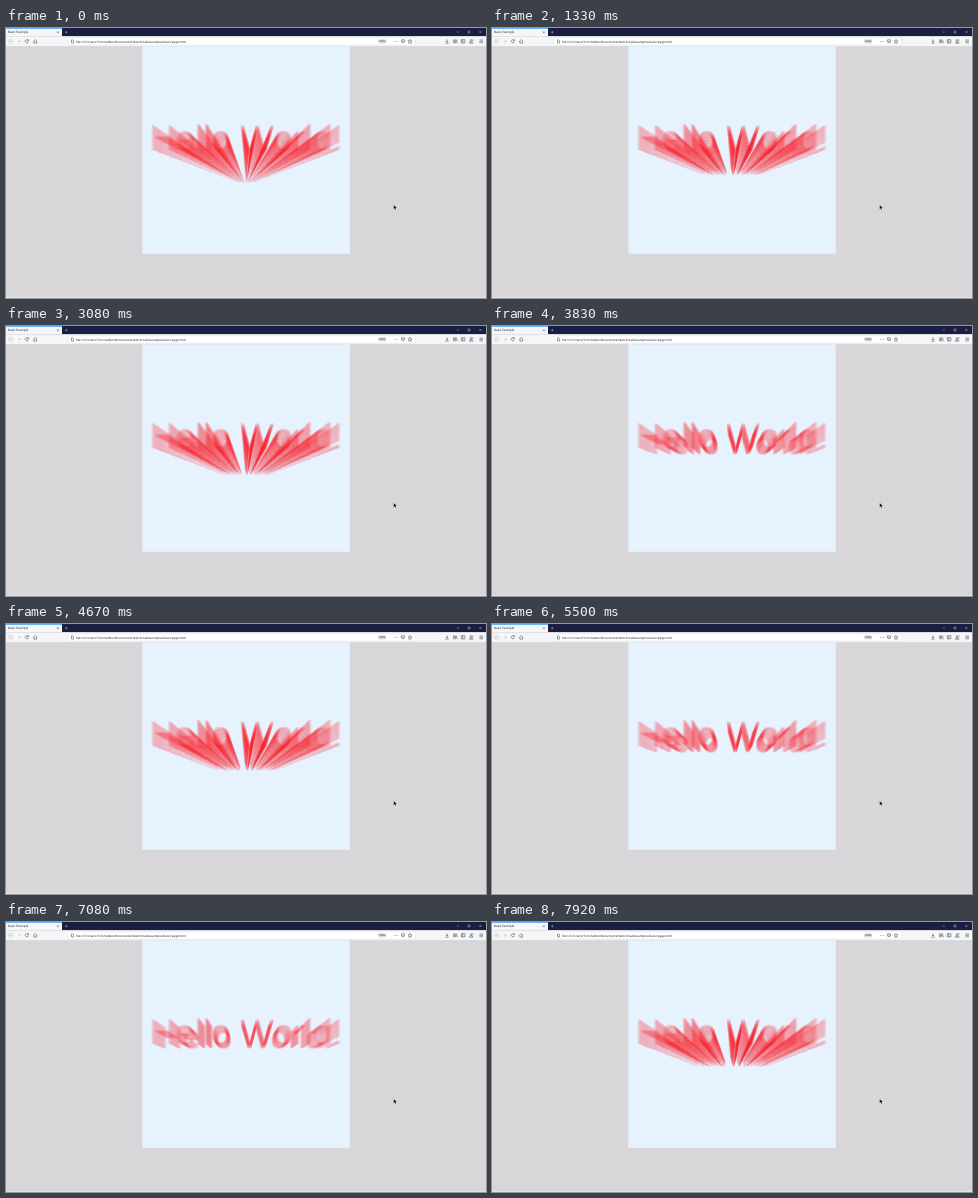
An HTML page that plays this animation: 480 by 270 pixels, repeating every 8.01 s.

```html
<!DOCTYPE html>
<html lang="en">
<head>
<meta charset="utf-8">
<title>Basic Example</title>
<style>
  html, body { margin: 0; width: 100%; height: 100%; overflow: hidden; background: #d8d6d8; }
  svg { display: block; width: 100vw; height: 100vh; }
  text { text-rendering: geometricPrecision; }
  .ui { font-family: "Noto Sans", "Open Sans", sans-serif; font-size: 3px; fill: #222; }
  .icon { fill: none; stroke: #4a4a4f; stroke-width: .55; }
  .light { stroke: #d4d5de; stroke-width: .4; }
  .off { stroke: #b9b9bd; }
  #trail { font: 36px "Liberation Sans", Arial, sans-serif; fill: #ff282d; text-anchor: middle; }
</style>
</head>
<body>
<svg viewBox="0 0 480 270">
  <rect width="480" height="270" fill="#d8d6d8"/>
  <rect y="269.4" width="480" height=".6" fill="#eeeeef"/>

  <!-- tab strip -->
  <rect width="480" height="8.3" fill="#1b1e43"/>
  <rect width="56" height="8.3" fill="#f5f6f7"/>
  <rect width="56" height=".6" fill="#0a84ff"/>
  <text class="ui" x="2" y="5.4">Basic Example</text>
  <path class="icon" d="M51 3.4l1.8 1.8m0-1.8l-1.8 1.8"/>
  <path class="icon light" d="M59 4.2h2.6m-1.3-1.3v2.6M450.7 4h2.2M462 3h2v2h-2zM473.4 3l2 2m0-2l-2 2"/>

  <!-- toolbar -->
  <rect y="8.3" width="480" height="10" fill="#f5f6f7"/>
  <rect y="18" width="480" height=".3" fill="#c8c8cb"/>
  <g class="icon">
    <circle class="off" cx="4.8" cy="13.3" r="2.4" stroke-width=".35"/>
    <path class="off" d="M6 13.3H3.6m1-1l-1 1 1 1M11.8 13.3h2.6m-1-1l1 1-1 1"/>
    <path d="M22.2 12.4a1.6 1.6 0 1 0 .2 1.3M22.5 11.4v1.3h-1.3"/>
    <path d="M27.2 13.5l2-1.9 2 1.9M27.9 13.2v1.9h2.6v-1.9"/>
  </g>
  <rect x="62" y="9.8" width="347.5" height="7.2" rx=".5" fill="#fff" stroke="#cfcfd2" stroke-width=".3"/>
  <path class="icon" stroke-width=".4" d="M65.5 11.9h1.3l.8.8v2.3h-2.1z"/>
  <text class="ui" x="70" y="14.6" font-size="3.1">file:///C:/Users/Tom Velden/Documents/Sketch/Lab/examples/basic/page.html</text>
  <rect x="371.7" y="11.3" width="8.8" height="4.2" rx="2.1" fill="#dcdcde"/>
  <text class="ui" x="376.1" y="14.3" text-anchor="middle" style="font-size:2.5px">100%</text>
  <g fill="#4a4a4f">
    <circle cx="388.6" cy="13.4" r=".4"/><circle cx="390" cy="13.4" r=".4"/><circle cx="391.4" cy="13.4" r=".4"/>
  </g>
  <g class="icon">
    <path d="M395.4 11.8h3.2v1.4a1.6 1.6 0 0 1-3.2 0zM396.2 12.9l.8.8.8-.8"/>
    <path d="M404 11.4l.6 1.3 1.4.2-1 1 .2 1.4-1.2-.7-1.2.7.2-1.4-1-1 1.4-.2z"/>
    <path d="M441 11.4v2.7m-1.1-1.1l1.1 1.1 1.1-1.1M439.3 15.2h3.4"/>
    <path d="M447.6 11.5v3.7m1.1-3.7v3.7m1-3.7v3.7m.6-3.6l1.1 3.6"/>
    <path d="M455.3 11.7h3.6v3.2h-3.6zM456.7 11.7v3.2"/>
    <circle cx="465.2" cy="12.5" r=".9"/>
    <path d="M463.5 15.2a1.7 1.5 0 0 1 3.4 0zM473.4 12h3.6m-3.6 1.4h3.6m-3.6 1.4h3.6"/>
    <circle cx="467" cy="12" r=".6" fill="#0a84ff" stroke="none"/>
  </g>

  <!-- page -->
  <rect x="136.3" y="18.3" width="207.5" height="207.5" fill="#e6f2fe"/>
  <g id="trail"></g>
  <path d="M387.7 176.9v4.4l1-.9.7 1.7.8-.3-.7-1.7h1.4z" fill="#000" stroke="#fff" stroke-width=".25"/>
</svg>
<script>
  const LOOP = 8010, STEP = 250 / 3, LAST = 95;
  const CYCLE = 1676, RESET = 153, GROW = 1667;
  const LAYERS = 100, SIZE = 36, BASE = 122;
  const trail = document.getElementById("trail");

  // Each layer shrinks and sinks towards one vanishing point.
  const layers = Array.from({ length: LAYERS }, (_, i) => {
    const k = i / LAYERS;
    const el = document.createElementNS("http://www.w3.org/2000/svg", "text");
    el.textContent = "Hello World!";
    el.setAttribute("transform", `translate(240 ${BASE + SIZE * k}) scale(${1 - k})`);
    el.setAttribute("fill-opacity", 0.1);
    trail.append(el);
    return el;
  });

  let shown = -1;
  function draw(ms) {
    const frame = Math.min(LAST, Math.floor((ms % LOOP + 4) / STEP));
    const time = Math.round(frame * STEP / 10) * 10;
    const age = (time - RESET + CYCLE) % CYCLE;
    const count = Math.min(LAYERS, Math.floor(age / GROW * LAYERS) + 1);
    if (count === shown) return;
    shown = count;
    layers.forEach((el, i) => el.setAttribute("display", i < count ? "inline" : "none"));
  }

  const start = performance.now();
  function tick() {
    draw(performance.now() - start);
    requestAnimationFrame(tick);
  }
  tick();
</script>
</body>
</html>
```
